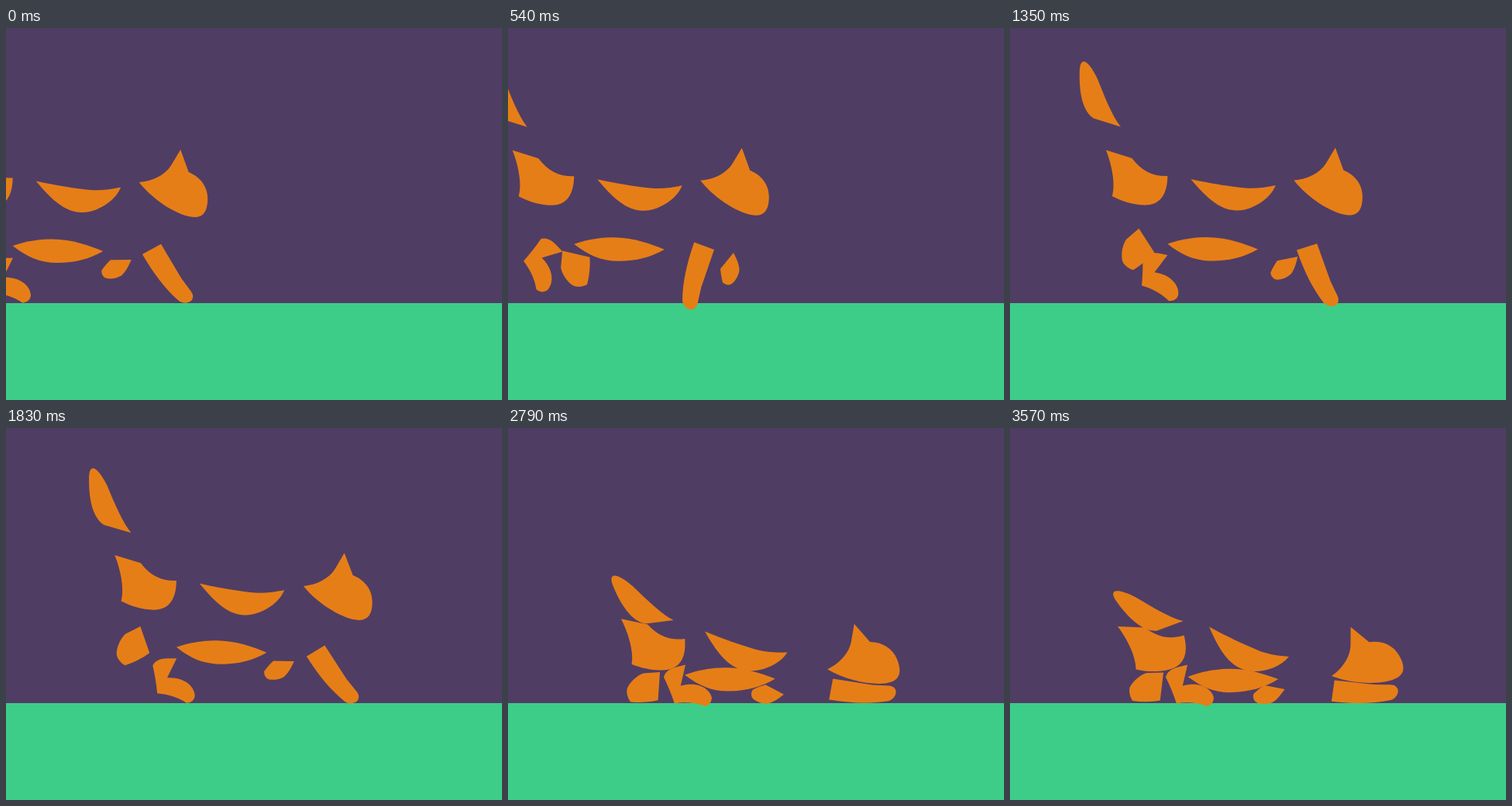
Write an HTML page that moves like this. It is 640 by 480 pixels and loops after 3600 ms.

```html
<!DOCTYPE html>
<html lang="en">
<head>
<meta charset="utf-8">
<title>Walking cat</title>
<style>
  html, body { margin: 0; width: 100%; height: 100%; overflow: hidden; background: #503d64; }
  svg { display: block; width: 640px; height: 480px; }
</style>
</head>
<body>
<svg viewBox="0 0 640 480" xmlns="http://www.w3.org/2000/svg">
  <rect width="640" height="480" fill="#503d64"/>
  <rect y="355" width="640" height="125" fill="#3dcd88"/>
  <g id="cat" fill="#e67e17"></g>
</svg>
<script>
const LOOP = 3600, STEP = 30, STRIDE = 900;
const cat = document.getElementById('cat');

const span = (t, from, to) => Math.min(1, Math.max(0, (t - from) / (to - from)));
const smooth = u => u * u * (3 - 2 * u);
const mix = (a, b, k) => a.map((v, i) => v + (b[i] - v) * k);

// Cubic bezier easing, solved by bisection
function bezier(x1, y1, x2, y2) {
  const at = (a, b, s) => 3 * a * s * (1 - s) ** 2 + 3 * b * s * s * (1 - s) + s ** 3;
  return u => {
    let lo = 0, hi = 1;
    for (let i = 0; i < 24; i++) {
      const mid = (lo + hi) / 2;
      if (at(x1, x2, mid) < u) lo = mid; else hi = mid;
    }
    return at(y1, y2, lo);
  };
}
const ease = bezier(0.25, 0.1, 0.25, 1);
const travel = bezier(0.43, 0.41, 0.61, 1);

// Everything the parts share at time t
function motion(t) {
  const walking = Math.min(t, 2 * STRIDE);
  const first = walking < STRIDE;
  const u = walking / STRIDE - (first ? 0 : 1);
  return {
    x: -136.8 + 210.8 * travel(span(t, 0, 1755)),
    y: -0.2 + 1.3 * Math.cos(2 * Math.PI * walking / STRIDE),
    swing: first ? ease(u) : 1 - ease(u),
    lead: (first ? 28 : 9) * Math.sin(Math.PI * u),
    fall: smooth(span(t, 1695, 2760)),
    settle: span(t, 2775, 3570)
  };
}

// Poses are [dx, dy, degrees]; legs swing between plant and pass, then all drop to down and rest
function part(path, pivot, { plant, pass = [0, 0, 0], down, rest = down }) {
  const el = document.createElementNS('http://www.w3.org/2000/svg', 'path');
  el.setAttribute('d', path);
  cat.append(el);
  return m => {
    const stride = plant ? mix(plant, pass, m.swing) : pass;
    const [x, y, r] = mix(mix(stride, down, m.fall), rest, m.settle);
    const lead = plant ? m.lead : 0;
    el.setAttribute('transform',
      `translate(${m.x + lead + x} ${m.y + y}) rotate(${r} ${pivot})`);
  };
}

const parts = [
  // tail
  part('M85 129L50 118C38 110 31 90 32 58C32 40 41 38 55 67C65 92 74 115 85 129Z', '85 129',
    { down: [54.5, 118, -24], rest: [64.5, 119, -37.5] }),
  // rump
  part('M66 159L99.5 169.5C112 186 126 193 145.5 192.5C145 218 135 230 116 230C102 230 86 225 74 218.5C78 205 75 182 66 159Z', '66 159',
    { down: [6, 86, -5.3], rest: [-1, 96, -15.3] }),
  // back
  part('M175.5 196.5C200 202 226 206 246 208C260 209 272 207 285 204.5C277 224 253 237 235 237C213 237 195 220 175.5 196.5Z', '175.5 196.5',
    { down: [4.5, 65, 10], rest: [7.5, 59, 16.3] }),
  // head
  part('M308.5 198C325 197 342 189 350 176L362 156L372.5 185C387 191 397 203 397 219C397 236 391 243 380 243C362 243 328 223 308.5 198Z', '308.5 198',
    { down: [29.5, 112, -21], rest: [32.5, 121, -30.7] }),
  // belly
  part('M145.5 280C165 273 183 271.5 197 271.5C222 271.5 245 280 262 287C245 297 225 302 203 302C180 302 163 294 145.5 280Z', '146 280',
    { down: [8.5, 37.4, -1], rest: [10, 40, -2] }),
  // near front leg
  part('M269.5 276L294 288.5L272 335L265 355C263 360 260 362 256 362C250 361 246 355 246 349C249 325 257 302 269.5 276Z', '281.75 282.25',
    { plant: [43, 2, -56], down: [61, 53.7, -106.5], rest: [61, 55.7, -109] }),
  // far front paw
  part('M328 290.5C333 298 337 305 338 312C338 320 333 330 328 332C324 333 321 332 318.5 330C316 324 314.5 318 313.5 313Z', '328 290.5',
    { plant: [-29.5, 7.5, 57], down: [-46, 52.4, 85.5], rest: [-47.5, 45.4, 68] }),
  // near hind leg
  part('M219.5 297L207 322C230 321 242 334 242.5 345C242 351 238 354 232 355C222 348 208 343 194 342C193 330 191 317 188.5 306C192 299 200 297 207 297Z', '219.5 297',
    { plant: [-73.7, -1.3, 0], pass: [-121, -8, 53], down: [-64.5, 7.4, -13.6] }),
  // far hind leg
  part('M172 253.5L184.5 287.5C176 294 165 300 153 304C147 301 142 294 142 289C142 280 147 269 153 263.5Z', '172 253.5',
    { plant: [-73.7, -1.3, 0], pass: [-67.5, 40, -64.2], down: [-50, 60.4, 24], rest: [-48, 61, 27] })
];

const start = performance.now();
function draw(now) {
  const t = Math.floor(Math.max(0, now - start) % LOOP / STEP) * STEP;
  const m = motion(t);
  parts.forEach(pose => pose(m));
  requestAnimationFrame(draw);
}
draw(start);
</script>
</body>
</html>
```
